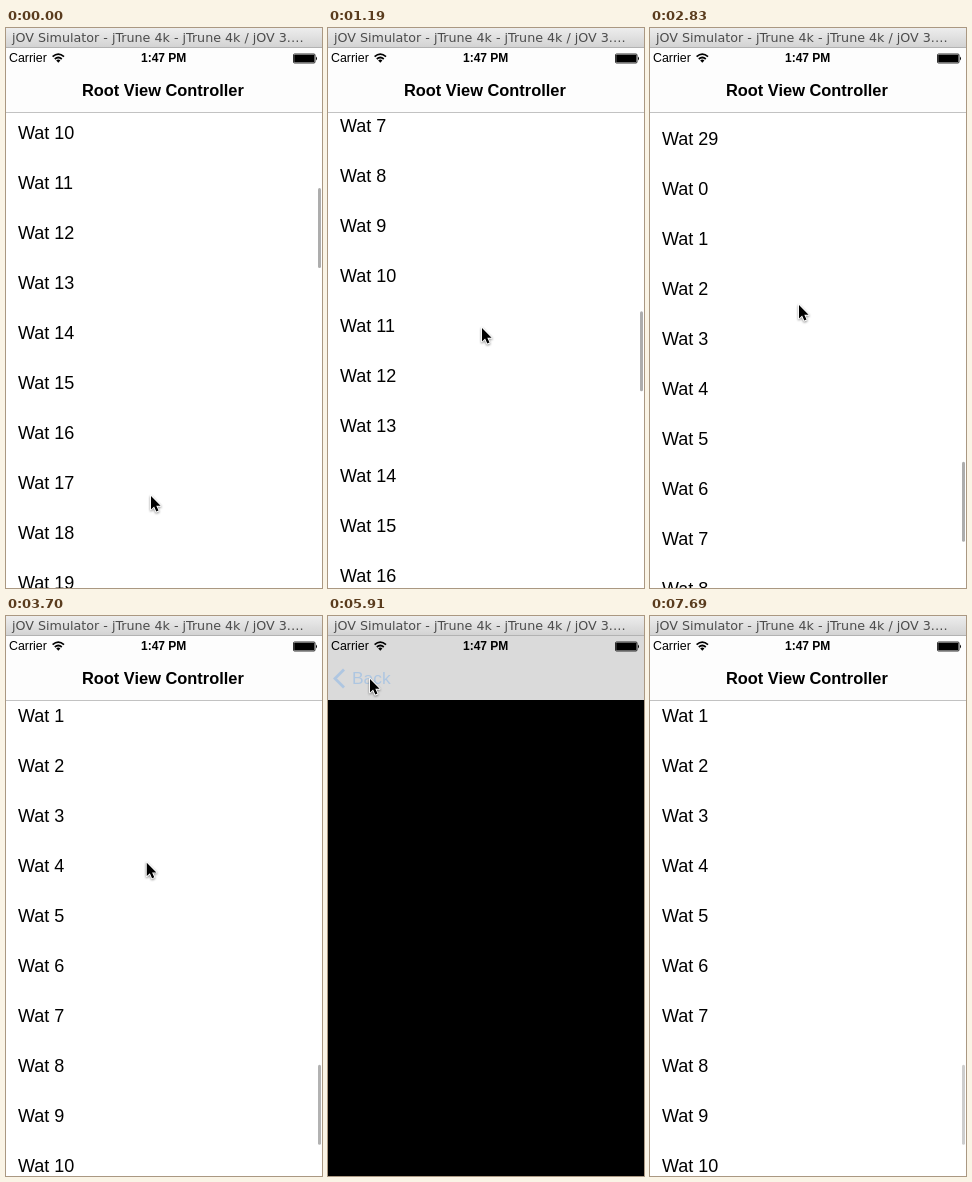
Recreate the animation shown at these times as an HTML page. Size 316x560 px, loop 7920 ms.

```html
<!DOCTYPE html>
<html lang="en">
<head>
<meta charset="utf-8">
<title>Table view demo</title>
<style>
  html, body { margin: 0; width: 100%; height: 100%; overflow: hidden; background: #000; }
  #stage { position: relative; width: 316px; height: 560px; overflow: hidden; background: #000;
    font-family: "Liberation Sans", Arial, sans-serif; color: #000; }
  #stage * { position: absolute; white-space: nowrap; }
  #window { left: 0; top: 0; width: 316px; height: 20px; box-sizing: border-box;
    background: linear-gradient(#ededed, #d3d3d3); border-bottom: 1px solid #b2b2b2; }
  #window span { left: 6px; top: 0; font: 12.7px/19px "DejaVu Sans", sans-serif; color: #4c4c4c; }
  #view { left: 0; top: 84px; width: 316px; height: 476px; overflow: hidden; background: #fff; }
  #rows { left: 0; top: 0; width: 316px; }
  #rows div { left: 0; width: 316px; height: 50px; font-size: 18px; line-height: 50px; text-indent: 12px; }
  #rows #glow { margin-top: -1px; height: 51px; background: #d7d7d7; }
  #thumb { left: 312px; top: 0; width: 2.5px; height: 80px; border-radius: 1.5px; background: #adadad; }
  #dim { inset: 0; background: #000; }
  #line { left: 0; top: 84px; width: 316px; height: 1px; background: rgba(0, 0, 0, .24); }
  #bar { left: 0; top: 20px; width: 316px; height: 64px; overflow: hidden; }
  #title { left: 0; top: 32px; font-size: 16.4px; font-weight: bold; line-height: 20px; }
  #back { left: 0; top: 32px; font-size: 17.4px; line-height: 20px; color: #007aff; }
  #carrier { left: 3px; top: 3px; font-size: 12.4px; line-height: 15px; }
  #clock { left: 135px; top: 3px; font-size: 12px; font-weight: bold; line-height: 15px; }
  svg { left: 0; top: 0; overflow: visible; }
  #cursor { left: .5px; top: .5px; filter: drop-shadow(0 1px 1px rgba(0, 0, 0, .45)); }
</style>
</head>
<body>
<div id="stage">
  <div id="view">
    <div id="rows"><div id="glow"></div></div>
    <div id="thumb"></div>
    <div id="dim"></div>
  </div>
  <div id="line"></div>
  <div id="bar">
    <span id="title">Root View Controller</span>
    <span id="back">Back</span>
    <svg id="chevron" width="20" height="64"><path d="M16 33.5L7 42.5L16 51.5" fill="none" stroke="#007aff" stroke-width="2.8"/></svg>
    <span id="carrier">Carrier</span>
    <span id="clock">1:47 PM</span>
    <svg width="316" height="20">
      <path d="M46.6 8.6Q52.3 3.6 58 8.6M48.8 11Q52.3 8 55.8 11" fill="none" stroke="#000" stroke-width="1.7"/>
      <path d="M50.2 12.4Q52.3 10.8 54.4 12.4L52.3 14.8Z"/>
      <rect x="287.5" y="6" width="21.5" height="9" rx="1" fill="none" stroke="#000" stroke-width=".8"/>
      <rect x="288.2" y="6.7" width="20.1" height="7.6" rx=".6"/>
      <path d="M310 8.5Q312 10.5 310 12.5Z"/>
    </svg>
  </div>
  <div id="window"><span>jOV Simulator - jTrune 4k - jTrune 4k / jOV 3.…</span></div>
  <svg id="cursor" width="12" height="18">
    <path d="M0 0V13.4L3.1 10.6L5.3 15.6L7.5 14.6L5.3 9.8H9.6Z" stroke="#fff" stroke-width="1.8" paint-order="stroke" stroke-linejoin="round"/>
  </svg>
</div>
<script>
const LOOP = 7920, STEP = 60, ROW = 50, PICKED = 55, FIRST = 9.9;
const PUSH = 4500, PUSHED = 4980, PRESS = 5880, POP = 6090;

// Each flick swings the pointer and brings a row to the top of the list.
const FLICKS = [
  { start: 0, end: 1190, row: 27.04, x: 153, y: 299 },
  { start: 1190, end: 2210, row: 40.32, x: 161, y: 160 },
  { start: 2210, end: 2830, row: 48.78, x: 148, y: 276 },
];
const REST = { start: 2830, end: 3410, row: 51 };
const GLIDES = [
  { start: 2830, end: 2950, x: 150, y: 234 },
  { start: 3640, end: 3980, x: 92, y: 300 },
  { start: 5100, end: 5400, x: 166, y: 180 },
  { start: 5400, end: 5850, x: 41, y: 62 },
  { start: 6630, end: 7170, x: 244, y: 514 },
  { start: 7290, end: 7470, x: 272, y: 566 },
];
const BEATS = [PUSH, POP, ...[...FLICKS, ...GLIDES].flatMap(m => [m.start, m.end])];

const el = id => document.getElementById(id);
const mix = (a, b, p) => a + (b - a) * p;
const ramp = (t, start, end) => Math.min(1, Math.max(0, (t - start) / (end - start)));

// The picture advances in even steps counted from the latest gesture.
function snap(t) {
  const beat = Math.max(...BEATS.filter(b => b <= t));
  return beat + Math.floor((t - beat) / STEP) * STEP;
}

function spring(ms) {
  const x = ms * .0216;
  return 1 - (1 + x) * Math.exp(-x);
}

function move(id, x, y = 0) {
  el(id).style.transform = `translate(${x}px, ${y}px)`;
}

function fade(id, alpha) {
  el(id).style.opacity = alpha;
}

function topRow(t) {
  const flicked = FLICKS.reduce((row, f) => mix(row, f.row, ramp(t, f.start, f.end)), FIRST);
  const left = 1 - ramp(t, REST.start, REST.end);
  return mix(flicked, REST.row, 1 - left * left);
}

function pointer(t) {
  let x = 144, y = 467;
  for (const m of [...FLICKS, ...GLIDES]) {
    const p = ramp(t, m.start, m.end);
    x = mix(x, m.x, p);
    y = mix(y, m.y, p);
    if (m.row) y -= 110 * Math.sin(2 * Math.PI * p);
  }
  return [x, y];
}

function addRows() {
  for (let n = 0; n < 70; n++) {
    const row = document.createElement("div");
    row.textContent = "Wat " + (n < 20 ? n : (n - 20) % 30);
    row.style.top = n * ROW + "px";
    el("rows").append(row);
  }
  el("glow").style.top = PICKED * ROW + "px";
}

function drawList(t, p) {
  const row = topRow(t), passed = row - FIRST;
  move("rows", 0, Math.round(-9 - ROW * row));
  move("thumb", 0, 76 + 7.32 * passed - .0072 * passed ** 2);
  fade("thumb", 1 - ramp(t, 3680, 3980) + ramp(t, 6500, 6680) - .4 * ramp(t, 7560, 7650));
  fade("glow", t < PUSH ? 0 : t < POP ? 1 : p);
  fade("dim", .1 * p);
  move("view", Math.round(-95 * p));
}

function drawBar(t, p, covered) {
  const edge = 316 - 95 * p, light = mix(253, 246, p);
  el("bar").style.background = covered ? "#dadada"
    : `linear-gradient(90deg, rgb(${light} ${light} ${light}) ${edge - 14 * p}px, #d9d9d9 ${edge + 22 * p}px)`;
  const backAlpha = p ** 20 * (t < PRESS ? 1 : .2);
  move("title", mix(76, 24.5, p));
  move("back", mix(140, 24, p));
  fade("title", 1 - p);
  fade("back", backAlpha);
  fade("chevron", backAlpha);
}

function draw(now) {
  const t = snap(now % LOOP);
  const covered = t >= PUSHED && t < POP;
  const p = t < PUSH ? 0 : covered ? 1 : t < POP ? spring(t - PUSH) : 1 - spring(t - POP);
  drawList(t, p);
  drawBar(t, p, covered);
  el("view").style.visibility = covered ? "hidden" : "visible";
  move("cursor", ...pointer(t));
}

addRows();
const start = performance.now();
function tick() {
  draw(performance.now() - start);
  requestAnimationFrame(tick);
}
tick();
</script>
</body>
</html>
```
